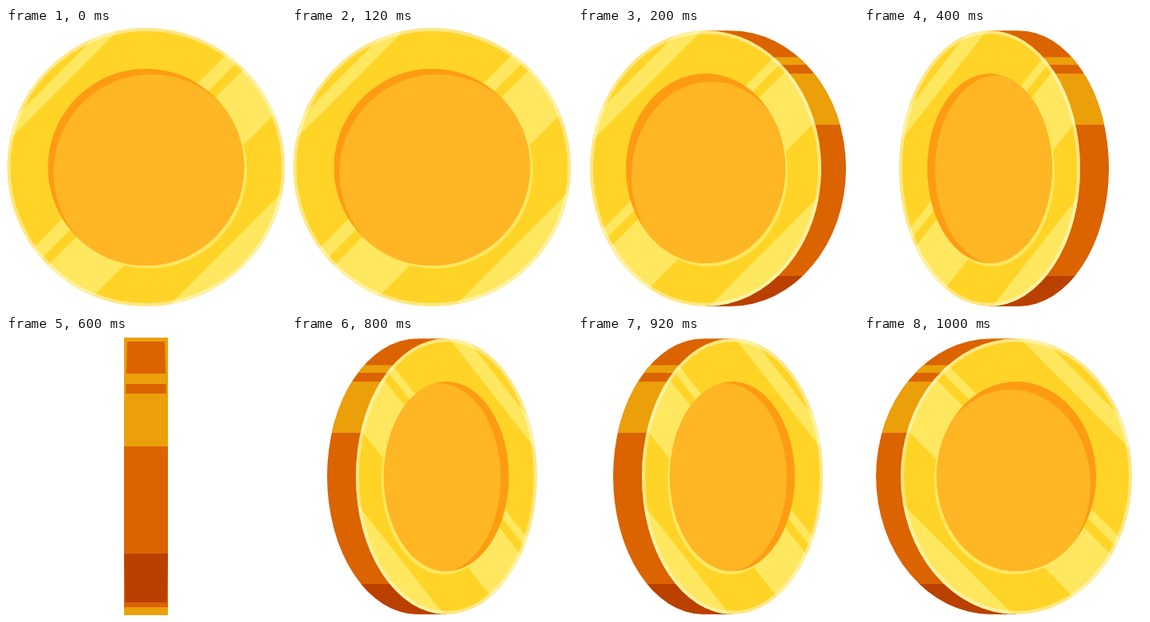
An HTML page with a canvas for the animation above (1200 ms loop, 351 by 350 pixels).

```html
<!DOCTYPE html>
<html lang="en">
<head>
<meta charset="utf-8">
<title>Spinning coin</title>
<style>
  html, body { margin: 0; width: 100%; height: 100%; overflow: hidden; background: #fff; }
  canvas { display: block; }
</style>
</head>
<body>
<canvas id="coin" width="351" height="350"></canvas>
<script>
const W = 351, H = 350, STEP = 200;
const ctx = document.getElementById('coin').getContext('2d');

const YELLOW = '#ffd426', SHINE = '#ffe75f', RIM = 'rgba(255,255,255,.43)';
const SHADE = '#fd9c13', CORE = '#ffb625';
const ORANGE = '#db6300', GOLD = '#eba009', DARK = '#ba4000';

// Shine bands are pairs of diagonal offsets from the face centre.
const FRONT = {
  cx: 175.5, cy: 174, rx: 174, ry: 174, hx: 123, hy: 123,
  core: [7, 7], lip: [3.5, 3.5], depth: 0,
  bands: [[-227, -206], [-40, -17], [0, 95], [202, 400]]
};
const TURNED = {
  cx: 160, cy: 175.5, rx: 145, ry: 172.3, hx: 100, hy: 118.5,
  core: [7, 10], lip: [3, 4], depth: 31,
  bands: [[-205, -177], [-53, -37], [-21, 79], [177, 400]]
};
const STEEP = {
  ...TURNED, cx: 157.5, rx: 113.5, hx: 78.3, core: [10, 2], depth: 36
};

function oval(x, y, rx, ry) {
  ctx.beginPath();
  ctx.ellipse(x, y, rx, ry, 0, 0, Math.PI * 2);
}

function fillOval(color, ...shape) {
  oval(...shape);
  ctx.fillStyle = color;
  ctx.fill();
}

function rows(x, w, list) {
  for (const [color, top, bottom] of list) {
    ctx.fillStyle = color;
    ctx.fillRect(x, top, w, bottom - top);
  }
}

function poly(color, ...pts) {
  ctx.beginPath();
  for (const [x, y] of pts) ctx.lineTo(x, y);
  ctx.fillStyle = color;
  ctx.fill();
}

function clipped(draw) {
  ctx.save();
  ctx.clip();
  draw();
  ctx.restore();
}

function side({ cx, cy, rx, ry, depth }) {
  ctx.beginPath();
  ctx.moveTo(cx, cy - ry);
  ctx.ellipse(cx + depth, cy, rx, ry, 0, -Math.PI / 2, Math.PI / 2);
  ctx.lineTo(cx, cy + ry);
  ctx.closePath();
  clipped(() => rows(0, W, [
    [ORANGE, 0, H], [GOLD, 36.5, 46], [GOLD, 57, 121], [DARK, 310, H]
  ]));
}

function face(v) {
  const { cx, cy, rx, ry, hx, hy, core, lip } = v;
  // Bands stay at 45 degrees until the face narrows past the first turn.
  const squash = v === STEEP ? STEEP.rx / TURNED.rx : 1;

  fillOval(YELLOW, cx, cy, rx, ry);
  oval(cx, cy, rx, ry);
  clipped(() => {
    ctx.translate(cx, cy);
    ctx.scale(squash, 1);
    for (const [a, b] of v.bands) {
      poly(SHINE, [a - 300, 300], [a + 300, -300], [b + 300, -300], [b - 300, 300]);
    }
  });

  oval(cx, cy, rx - 2, ry - 2);
  ctx.strokeStyle = RIM;
  ctx.lineWidth = 4;
  ctx.stroke();

  fillOval(SHINE, cx + lip[0], cy + lip[1], hx, hy);
  fillOval(SHADE, cx, cy, hx, hy);
  oval(cx, cy, hx, hy);
  clipped(() => fillOval(CORE, cx + core[0], cy + core[1], hx, hy));
}

function coin(v, mirror) {
  ctx.save();
  if (mirror) {
    ctx.translate(W, 0);
    ctx.scale(-1, 1);
  }
  if (v.depth) side(v);
  face(v);
  ctx.restore();
}

function edge() {
  rows(148, 55, [[GOLD, 2, 138], [ORANGE, 138, 339], [GOLD, 339, 349]]);
  ctx.beginPath();
  for (const [x, y] of [[152, 7], [199, 7], [203, 138], [148, 138]]) ctx.lineTo(x, y);
  clipped(() => rows(148, 55, [[ORANGE, 7, 47], [ORANGE, 60, 72]]));
  poly(DARK, [148, 272], [203, 272], [201.5, 333], [149.5, 333]);
}

const poses = [
  () => coin(FRONT),
  () => coin(TURNED),
  () => coin(STEEP),
  edge,
  () => coin(STEEP, true),
  () => coin(TURNED, true)
];

const start = performance.now();

function tick() {
  const t = performance.now() - start;
  ctx.fillStyle = '#fff';
  ctx.fillRect(0, 0, W, H);
  poses[Math.floor(t / STEP) % poses.length]();
  requestAnimationFrame(tick);
}
tick();
</script>
</body>
</html>
```
